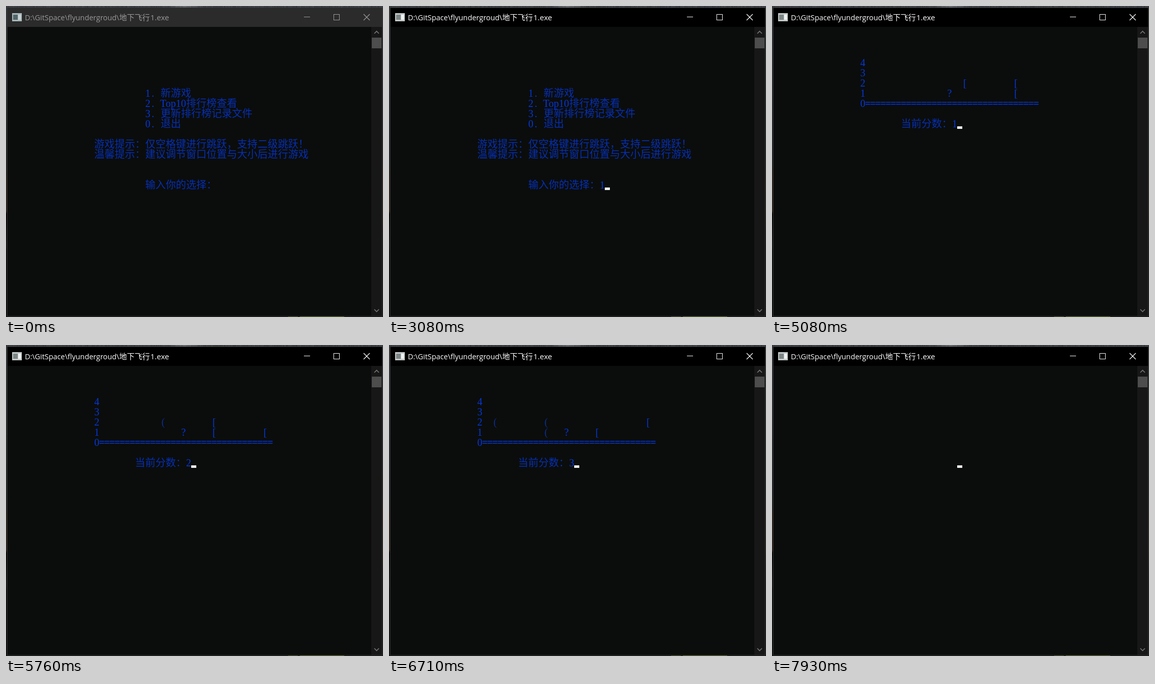
These frames come from a looping animation (739 px wide and 610 px high, 8000 ms). An HTML page with a canvas:

```html
<!DOCTYPE html>
<html lang="zh-CN">
<head>
<meta charset="utf-8">
<style>
  html, body { margin: 0; width: 100%; height: 100%; overflow: hidden; background: #0b0d0c; }
  canvas { display: block; }
</style>
</head>
<body>
<canvas id="stage" width="739" height="610"></canvas>
<script>
const ctx = document.getElementById('stage').getContext('2d');
const LOOP = 8000;
const CELL = 10, ROW = 20, LEFT = 3, TOP = 41;
const BLUE = '#0537da', WIDE_BLUE = '#062fb4', DIM_BLUE = '#0a2e8c', CONSOLE = '#0b0d0c';
const CONSOLE_FONT = '20px "Liberation Serif", "Noto Sans CJK SC", "Noto Sans CJK", serif';
const TITLE_FONT = '"Open Sans", "Noto Sans CJK SC", "Noto Sans CJK", sans-serif';

const MENU = [
  [6, 27, '1. 新游戏'],
  [7, 27, '2. Top10排行榜查看'],
  [8, 27, '3. 更新排行榜记录文件'],
  [9, 27, '0. 退出'],
  [11, 17, '游戏提示：仅空格键进行跳跃，支持二级跳跃！'],
  [12, 17, '温馨提示：建议调节窗口位置与大小后进行游戏'],
  [15, 27, '输入你的选择：'],
];

// Game timing: one step moves the obstacles one cell; the screen is seen once per tick.
const ACTIVE_AT = 910, TYPED_AT = 2450, ENTER_AT = 3530, CLEAR_AT = 3587;
const GAME_AT = 3655, STEP = 97, BLANK_PART = 0.11;
const TICK = 67.78, TICK_ORIGIN = 4265;
const PLAYER_COL = 34, SPAWN_COL = 51, GROUND_COL = 18, GROUND_ROW = 7, SPACING = 10;
const OBSTACLES = [[2], [1, 2], [1], [2], [1]];
const JUMPS = [{ start: 25, heights: [2, 3, 3, 3, 2] }, { start: 35, heights: [2, 3, 3, 3, 2] }];

function rect(x, y, w, h, color) {
  ctx.fillStyle = color;
  ctx.fillRect(x, y, w, h);
}

function line(color, ...points) {
  ctx.strokeStyle = color;
  ctx.beginPath();
  points.forEach(([x, y], i) => i ? ctx.lineTo(x, y) : ctx.moveTo(x, y));
  ctx.stroke();
}

function print(row, col, text, color = BLUE, weight = 300) {
  ctx.font = `${weight} ${CONSOLE_FONT}`;
  ctx.textAlign = 'center';
  for (const char of text) {
    const wide = char.charCodeAt(0) > 255;
    const span = wide ? 2 : 1;
    ctx.fillStyle = wide ? WIDE_BLUE : color;
    ctx.fillText(char, LEFT + (col + span / 2) * CELL, TOP + row * ROW + 17);
    col += span;
  }
}

function cursor(row, col) {
  rect(LEFT + col * CELL, TOP + row * ROW + 15, CELL, 5, '#f2f2f2');
}

function verticalFade(x, stops) {
  const fade = ctx.createLinearGradient(0, 0, 0, 610);
  stops.forEach(([at, color]) => fade.addColorStop(at / 610, color));
  rect(x, 0, 3, 610, fade);
}

function drawDesktop() {
  rect(0, 0, 739, 610, '#101111');
  verticalFade(0, [[0, '#34373b'], [300, '#24272a'], [330, '#2c241e'], [402, '#30241c'],
    [408, '#080707'], [470, '#1b1a19'], [480, '#111212']]);
  verticalFade(736, [[0, '#3a3d41'], [280, '#25282b'], [330, '#382c22'], [400, '#33281f'], [470, '#151515']]);
  for (let x = 0; x < 739; x++) {
    const noise = Math.abs(Math.sin(x * 127.1) * 43758.5) % 1;
    const glow = 35 * Math.exp(-(((x - 350) / 25) ** 2));
    const grey = 50 + noise * 20 + glow;
    rect(x, 0, 1, 3, `rgb(${grey},${grey + 3},${grey + 7})`);
  }
  rect(553, 608, 19, 2, '#414b1d');
  rect(576, 608, 87, 2, '#53631f');
}

function drawWindow(active) {
  const ink = active ? '#ffffff' : '#999999';
  rect(2, 3, 736, 606, '#303131');
  rect(3, 4, 734, 37, active ? '#000000' : '#2b2b2b');
  rect(3, 41, 713, 567, CONSOLE);

  rect(12, 14, 19, 16, active ? '#c3c9c9' : '#a9b8ba');
  rect(14, 17, 9, 10, active ? '#7d8584' : '#536568');
  rect(24, 17, 5, 10, active ? '#f2f3f2' : '#c8d2d3');

  ctx.textAlign = 'left';
  ctx.fillStyle = ink;
  ctx.font = '14.4px ' + TITLE_FONT;
  ctx.fillText('D:\\GitSpace\\flyundergroud\\', 37, 28);
  ctx.font = '15px ' + TITLE_FONT;
  ctx.fillText('地下飞行', 222, 28);
  ctx.fillText('1.exe', 283, 28);

  ctx.lineWidth = 1;
  line(ink, [584, 21.5], [596, 21.5]);
  ctx.strokeRect(642.5, 16.5, 11, 11);
  ctx.lineWidth = 1.2;
  line(ink, [701, 16], [713, 28]);
  line(ink, [713, 16], [701, 28]);

  rect(716, 41, 21, 567, '#171717');
  rect(717, 62, 19, 21, '#4d4d4d');
  ctx.lineWidth = 1.6;
  line('#777777', [722, 54], [726.5, 49.5], [731, 54]);
  line('#777777', [722, 595], [726.5, 599.5], [731, 595]);
}

function drawMenu(t) {
  MENU.forEach(([row, col, text]) => print(row, col, text));
  if (t >= TYPED_AT) print(15, 41, '1');
  if (t >= ENTER_AT) cursor(16, 0);
  else if (t >= 1460 && t < 1990) cursor(15, 41);
  else if ((t >= TYPED_AT && t < 2520) || t >= 3080) cursor(15, 42);
}

function playerHeight(step) {
  const jump = JUMPS.find(j => step >= j.start && step < j.start + j.heights.length);
  return jump ? jump.heights[step - jump.start] : 1;
}

function drawGame(t) {
  const seen = TICK_ORIGIN + Math.floor((t - TICK_ORIGIN) / TICK) * TICK;
  const progress = Math.max(0, (seen - GAME_AT) / STEP);
  const step = Math.floor(progress);
  cursor(9, 36);
  if (progress - step < BLANK_PART) return;

  for (let h = 0; h <= 4; h++) print(GROUND_ROW - h, 17, String(h));
  print(GROUND_ROW, GROUND_COL, '='.repeat(34), BLUE, 700);
  OBSTACLES.forEach((heights, i) => {
    const col = SPAWN_COL - step + i * SPACING;
    if (col < GROUND_COL || col > SPAWN_COL) return;
    const passed = col < PLAYER_COL;
    heights.forEach(h => print(GROUND_ROW - h, col, passed ? '(' : '[', passed ? DIM_BLUE : BLUE));
  });
  print(GROUND_ROW - playerHeight(step), PLAYER_COL, '?');
  print(9, 25, '当前分数：' + Math.floor(step / SPACING));
}

function draw(now) {
  const t = now % LOOP;
  drawDesktop();
  drawWindow(t >= ACTIVE_AT);
  if (t < CLEAR_AT) drawMenu(t);
  else if (t < GAME_AT) cursor(0, 0);
  else drawGame(t);
}

const start = performance.now();
function frame() {
  draw(performance.now() - start);
  requestAnimationFrame(frame);
}
frame();
</script>
</body>
</html>
```
